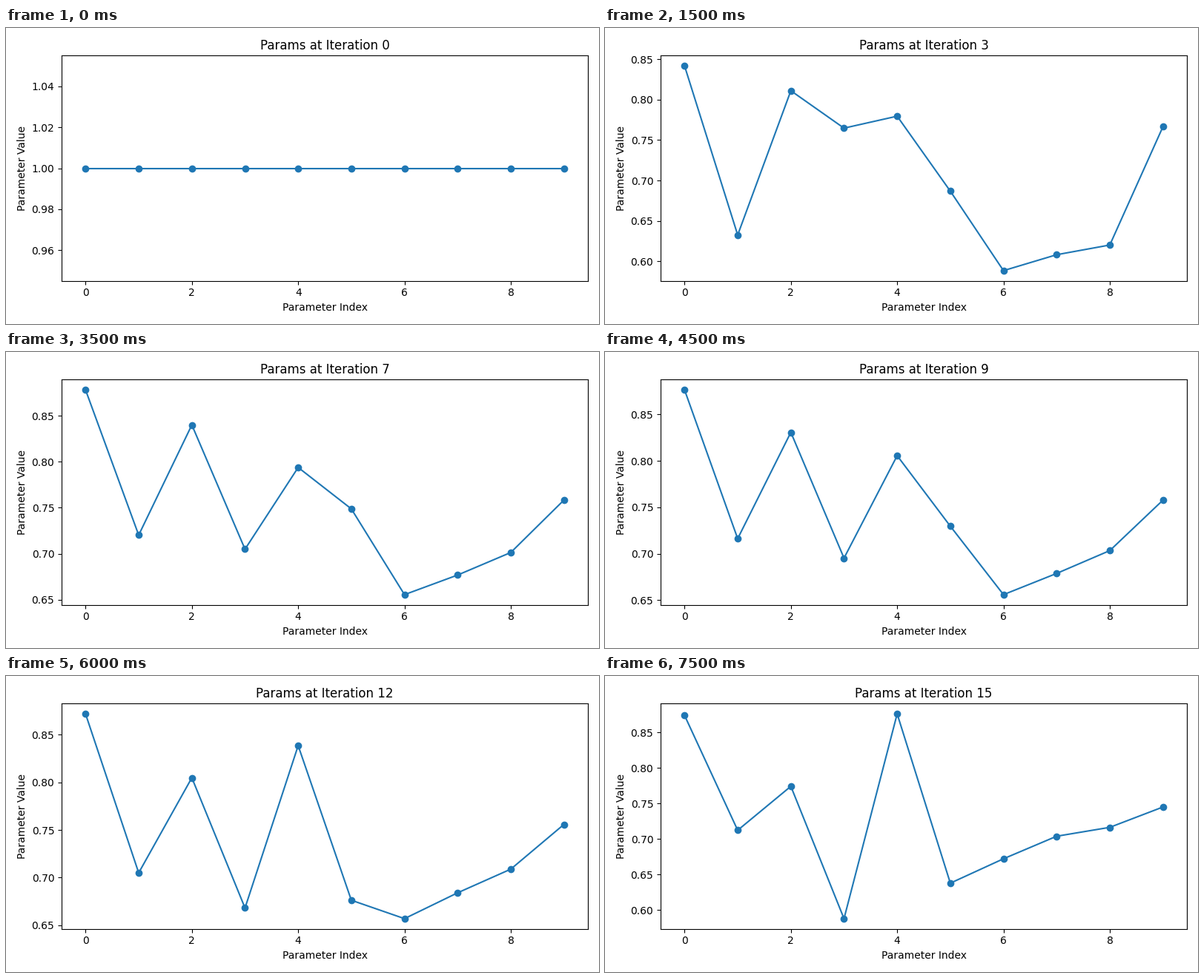
These frames come from a looping animation (800 px wide and 400 px high, 8 s). A matplotlib script:

```python
import matplotlib.pyplot as plt
import numpy as np
from matplotlib.animation import FuncAnimation

FRAMES = 16
INTERVAL = 500

# Key poses: iteration, easing power of the way there, parameter vector
POSES = [
    (0, 1.0, np.ones(10)),
    (2, 1.0, np.array([.8237, .5892, .7966, .7942, .7724,
                       .6561, .5553, .5742, .5800, .7705])),
    (7, 1.8, np.array([.8781, .7203, .8400, .7050, .7938,
                       .7488, .6556, .6769, .7014, .7584])),
    (12, 0.6, np.array([.8717, .7050, .8047, .6682, .8384,
                        .6763, .6570, .6841, .7089, .7558])),
    (15, 1.5, np.array([.8739, .7123, .7741, .5880, .8760,
                        .6379, .6722, .7039, .7164, .7450])),
]


def ease(u, power):
    """Slows down towards the end for power > 1, speeds up for power < 1."""
    return 1 - (1 - u) ** power


def params_at(step):
    for (t0, _, a), (t1, power, b) in zip(POSES, POSES[1:]):
        if step <= t1:
            return a + (b - a) * ease((step - t0) / (t1 - t0), power)


fig, ax = plt.subplots(figsize=(8, 4), dpi=100)


def draw(step):
    ax.clear()
    ax.plot(params_at(step), marker="o")
    ax.set_title(f"Params at Iteration {step}")
    ax.set_xlabel("Parameter Index")
    ax.set_ylabel("Parameter Value")
    # Lay out afresh, since the margins depend on the tick labels
    fig.subplots_adjust(left=.125, bottom=.11, right=.9, top=.88)
    fig.tight_layout()
    return ax.lines


anim = FuncAnimation(fig, draw, frames=FRAMES, interval=INTERVAL,
                     init_func=lambda: draw(0), repeat=True, repeat_delay=0)
plt.show()
```
